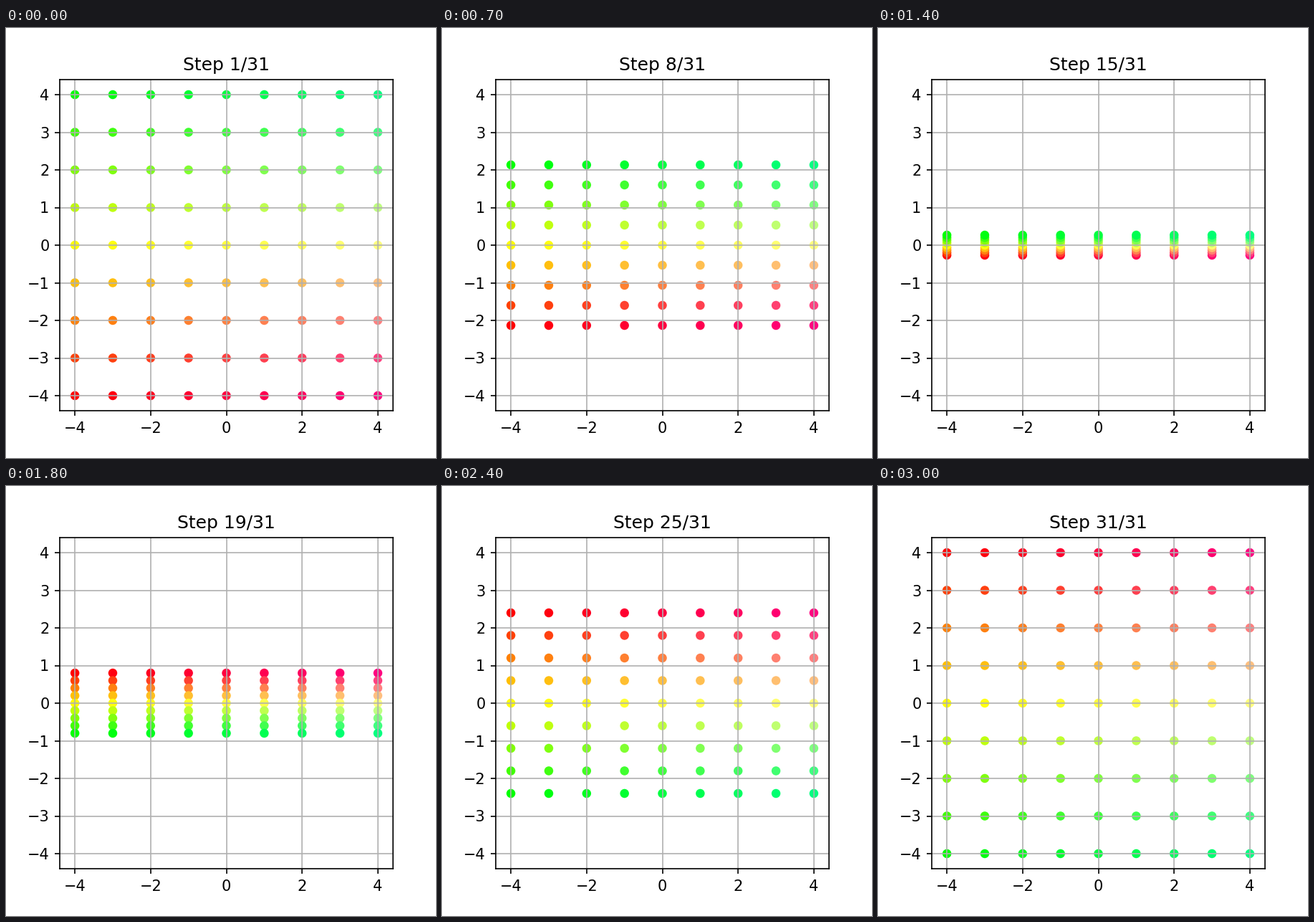
A matplotlib script that plays this animation: 600 by 600 pixels, repeating every 3.1 s.

```python
import numpy as np
import matplotlib.pyplot as plt
from matplotlib.animation import FuncAnimation

STEPS = 31

plt.rcParams["font.family"] = "DejaVu Sans"


def color(x, y):
    """Red to green along y, a little more blue along x."""
    return (min(1, 1 - y / 4), min(1, 1 + y / 4), 1 / 4 + x / 16)


side = np.linspace(-4, 4, 9)
grid = np.array([(x, y) for x in side for y in side])
colors = [color(x, y) for x, y in grid]

fig, ax = plt.subplots(figsize=(4, 4), dpi=150)
ax.set_xlim(-4.4, 4.4)
ax.set_ylim(-4.4, 4.4)
ax.set_xticks(range(-4, 5, 2))
ax.set_yticks(range(-4, 5))
ax.grid(True)

dots = ax.scatter(grid[:, 0], grid[:, 1], s=36, c=colors, edgecolor="none")
title = ax.set_title(f"Step 1/{STEPS}")


def update(i):
    # y scale runs linearly from 1 to -1, a reflection across the x axis
    scale = 1 - 2 * i / (STEPS - 1)
    dots.set_offsets(grid * [1, scale])
    title.set_text(f"Step {i + 1}/{STEPS}")
    return dots, title


anim = FuncAnimation(fig, update, frames=STEPS, interval=100,
                     repeat=True, blit=False)
plt.show()
```
